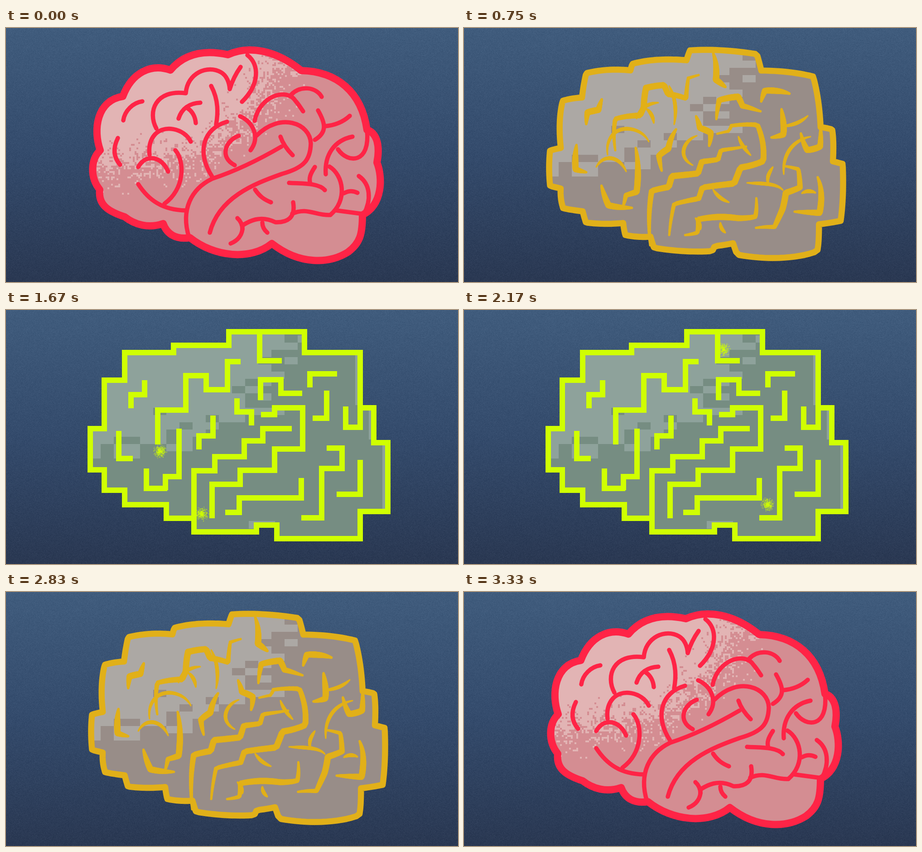
An HTML page with a canvas for the animation above (5010 ms loop, 998 px wide and 561 px high).

```html
<!DOCTYPE html>
<html lang="en">
<head>
<meta charset="utf-8">
<title>Brain maze</title>
<style>
html, body { margin: 0; width: 100%; height: 100%; overflow: hidden; background: #344969; }
canvas { display: block; width: 100vw; height: 100vh; }
</style>
</head>
<body>
<canvas id="stage" width="998" height="561"></canvas>
<script>
const W = 998, H = 561, LOOP = 5010, STEP = 83.34;
const ctx = document.getElementById('stage').getContext('2d');
const mix = (a, b, t) => a + (b - a) * t;
const rgb = (a, b, t) => `rgb(${a.map((v, i) => Math.round(mix(v, b[i], t)))})`;
const clamp = (v, lo, hi) => Math.min(hi, Math.max(lo, v));

function random(seed) {
  return () => {
    seed = (seed + 0x6D2B79F5) | 0;
    let t = Math.imul(seed ^ (seed >>> 15), 1 | seed);
    t = (t + Math.imul(t ^ (t >>> 7), 61 | t)) ^ t;
    return ((t ^ (t >>> 14)) >>> 0) / 4294967296;
  };
}
function hash(x, y) {
  let n = Math.imul(x, 374761393) ^ Math.imul(y, 668265263);
  n = Math.imul(n ^ (n >>> 13), 1274126177);
  return ((n ^ (n >>> 16)) >>> 0) / 4294967296;
}

function sample(d, count) {
  const path = document.createElementNS('http://www.w3.org/2000/svg', 'path');
  path.setAttribute('d', d);
  const length = path.getTotalLength();
  return Array.from({ length: count + 1 }, (_, i) => {
    const p = path.getPointAtLength(length * i / count);
    return [p.x, p.y];
  });
}

// Outline pieces between the notches: [brain, maze]
const outlineParts = [
  ['C535 38 595 48 652 94', 'V48 H659 V94'],
  ['C730 96 785 140 797 225', 'H782 V216'],
  ['C820 232 826 262 819 297', 'H812 V293'],
  ['C832 330 832 390 787 413', 'H843 V445 H782'],
  ['C787 455 782 475 755 495 C715 520 650 525 587 476', 'V505 H598 V475'],
  ['C540 514 460 506 406 463', 'H553 V490 H415 V460'],
  ['C375 468 355 455 347 432', 'H354 V430'],
  ['C315 443 285 435 262 417', 'H262 V398'],
  ['C225 405 203 390 207 357', 'H217 V353'],
  ['C185 330 187 290 208 270', 'H186 V262 H217'],
  ['C192 225 200 160 258 151', 'V155 H262'],
  ['C278 98 320 78 363 93', 'V94 H370'],
  ['C395 55 440 48 490 59', 'V78 H492']
];
function buildOutline(start, side) {
  let at = start;
  const points = outlineParts.flatMap(part => {
    const piece = sample(`M${at} ${part[side]}`, 24);
    at = piece[24];
    return piece;
  });
  return { points, path: new Path2D(`M${start} ${outlineParts.map(p => p[side]).join(' ')} Z`) };
}
const outline = [buildOutline([490, 59], 0), buildOutline([492, 78], 1)];

// Folds: [brain, maze]; those without a maze wall thin out and vanish
const folds = [
  ['M259 204 C262 183 280 165 301 162', 'M276 217 V187 H306 V155'],
  ['M247 243 C236 265 237 285 252 302', 'M249 267 V328 H280'],
  ['M332 222 C312 185 330 135 397 144 C400 100 445 80 475 98 C487 105 493 120 494 135 C500 115 508 100 518 86',
   'M335 297 V221 H397 V145 H442 V176 H489 V114 H518'],
  ['M533 60 C560 80 560 125 521 163', 'M560 54 V112 H609'],
  ['M488 207 C435 222 420 275 455 328', 'M457 233 V278 H426 V308'],
  ['M374 270 C395 295 395 355 350 388', 'M382 262 V368 H352 V398'],
  ['M292 345 C315 380 345 402 397 403', 'M310 350 V394 H356'],
  ['M404 462 C385 400 410 355 455 333 C510 315 560 290 608 262', 'M415 490 V355 H461 V324 H526 V289 H567 V262 H631'],
  ['M450 452 C470 375 545 345 610 322 C660 308 672 290 673 255 C672 210 605 185 553 238',
   'M455 460 V385 H517 V354 H593 V307 H655 V216 H593 V231 H563'],
  ['M517 195 C545 208 562 240 540 270', 'M510 195 V225 H542 V255'],
  ['M549 205 C560 150 620 130 640 162 C647 170 651 177 656 184', 'M562 199 V154 H607 V184 H654'],
  ['M630 147 C650 126 685 130 697 152', 'M671 171 V141 H731'],
  ['M689 182 C705 210 710 230 682 247', 'M708 178 V239 H677'],
  ['M733 268 C755 300 805 300 797 225', 'M750 213 V259 H782 V216'],
  ['M714 306 C745 325 755 380 716 413 C685 415 665 395 632 410', 'M708 305 H742 V350 H697 V459 H652'],
  ['M634 385 C640 420 620 430 595 429 C560 412 535 428 522 436 C524 458 510 470 496 476', 'M652 371 V415 H515 V447 H484'],
  ['M730 403 L790 411 C807 380 805 345 779 327', 'M730 407 H782 V331'],
  ['M453 128 C470 160 468 190 464 213'],
  ['M381 200 C388 178 405 166 429 165'],
  ['M402 178 C412 185 418 197 419 210'],
  ['M408 251 C395 222 345 210 325 240 C317 252 315 265 317 280'],
  ['M292 307 C310 275 345 285 358 317'],
  ['M606 240 C612 258 622 270 633 281'],
  ['M514 238 C485 248 470 285 505 303'],
  ['M703 217 C728 215 745 207 759 194'],
  ['M765 240 C725 248 703 280 706 323'],
  ['M746 365 C758 358 768 360 776 364'],
  ['M625 342 C655 344 690 342 704 358'],
  ['M682 307 C672 322 668 332 672 344'],
  ['M550 357 C560 372 570 379 585 385'],
  ['M511 420 C520 428 522 438 522 445'],
  ['M566 430 C566 440 570 446 577 452']
].map(([brain, maze]) => ({
  paths: [new Path2D(brain), maze && new Path2D(maze)],
  points: [sample(brain, 60), sample(maze || brain, 60)],
  vanishes: !maze
}));

// Spark positions, one per step
const FIRST_SPARK = 11;
const sparks = [
  [[525, 66], [455, 110], [385, 120], [319, 173], [322, 235], [255, 235], [240, 245], [207, 300], [275, 318],
   [340, 312], [365, 245], [430, 210], [495, 195], [525, 137], [615, 137], [572, 87], [574, 40]],
  [[609, 243], [535, 262], [450, 330], [384, 382], [398, 325], [440, 310], [500, 290], [450, 335], [432, 390],
   [432, 450], [433, 459], [470, 459], [475, 425], [530, 438], [600, 440], [670, 429], [675, 370], [678, 325],
   [740, 275], [795, 290], [828, 340], [851, 345]]
];

const rise = [.01, .03, .07, .12, .34, .64, .89];
const fall = [.95, .84, .64, .37, .17, .07, .03, .01];
function mazeAmount(step) {
  if (step < 4 || step >= 40) return 0;
  if (step < 11) return rise[step - 4];
  return step < 32 ? 1 : fall[step - 32];
}

function makeBackground() {
  const canvas = document.createElement('canvas');
  canvas.width = W;
  canvas.height = H;
  const c = canvas.getContext('2d'), g = c.createLinearGradient(0, 0, 0, H);
  g.addColorStop(0, '#405c7d');
  g.addColorStop(.5, '#344b6c');
  g.addColorStop(1, '#2a3852');
  c.fillStyle = g;
  c.fillRect(0, 0, W, H);
  const image = c.getImageData(0, 0, W, H), rnd = random(7);
  for (let i = 0; i < image.data.length; i += 4) {
    const grain = (rnd() + rnd() - 1) * 9;
    for (let j = 0; j < 3; j++) image.data[i + j] += grain;
  }
  c.putImageData(image, 0, 0);
  return canvas;
}
const background = makeBackground();

const blend = (a, b, t) => a.map((p, i) => [mix(p[0], b[i][0], t), mix(p[1], b[i][1], t)]);

function outlinePath(t) {
  if (t === 0 || t === 1) return outline[t].path;
  const path = new Path2D();
  blend(outline[0].points, outline[1].points, t).forEach(p => path.lineTo(...p));
  path.closePath();
  return path;
}

function drawTexture(shape, t) {
  ctx.save();
  ctx.clip(shape);
  ctx.fillStyle = rgb([212, 141, 146], [118, 141, 130], t);
  ctx.fillRect(170, 30, 700, 500);
  ctx.fillStyle = rgb([226, 180, 180], [142, 162, 155], t);
  const w = Math.round(4 + 25 * clamp(7 * (t - .09), 0, 1));
  const h = Math.max(4, Math.round(w * .56));
  for (let x = 180; x < 690; x += w) {
    const u = Math.max(0, (x + w / 2 - 250) / 370);
    const edge = 300 - 240 * u ** 3, slope = Math.hypot(1, 1.95 * u * u);
    for (let y = 40; y < 400; y += h) {
      const i = (x - 180) / w, j = (y - 40) / h;
      const noise = hash(i, j) + hash(i + 91, j + 17) + hash(i >> 1, (j >> 1) + 53) - 1.5;
      if ((edge - y - h / 2) / slope + noise * 62 > 0) ctx.fillRect(x, y, w, h);
    }
  }
  if (t === 1) {
    ctx.fillRect(771, 98, 6, 112);
    ctx.fillRect(801, 220, 6, 66);
    ctx.fillRect(831, 298, 6, 142);
    ctx.fillRect(536, 466, 58, 17);
  }
  ctx.restore();
}

function drawFold(fold, t) {
  if (t === 0 || t === 1) {
    if (!fold.paths[t]) return;
    ctx.lineWidth = t ? 12 : 9.5;
    ctx.stroke(fold.paths[t]);
    return;
  }
  // In between, folds swell in the middle and taper to the ends
  const taper = Math.min(1, 4 * t * (1 - t));
  const width = (mix(9.5, 12, t) + 3 * taper) * (fold.vanishes ? 1 - t * t : 1);
  const points = blend(...fold.points, t);
  for (let i = 1; i < points.length; i++) {
    const s = Math.abs(2 * (i - .5) / (points.length - 1) - 1);
    ctx.lineWidth = width * (1 - .7 * taper * s * s);
    ctx.beginPath();
    ctx.moveTo(...points[i - 1]);
    ctx.lineTo(...points[i]);
    ctx.stroke();
  }
}

function drawSpark([x, y], seed) {
  const rnd = random(seed);
  for (let i = 0; i < 420; i++) {
    const angle = rnd() * Math.PI * 2, r = 17 * rnd() ** 1.1 * (.55 + .45 * rnd());
    ctx.fillRect(x + r * Math.cos(angle), y + r * Math.sin(angle), 1.1, 1.1);
  }
}

function draw(step) {
  const t = mazeAmount(step), shape = outlinePath(t);
  ctx.drawImage(background, 0, 0);
  drawTexture(shape, t);
  ctx.strokeStyle = ctx.fillStyle = rgb([255, 36, 70], [208, 255, 0], t);
  ctx.lineCap = t === 1 ? 'butt' : 'round';
  ctx.lineJoin = t === 1 ? 'miter' : 'round';
  ctx.lineWidth = mix(16, 12, t);
  ctx.stroke(shape);
  folds.forEach(fold => drawFold(fold, t));
  sparks.forEach((route, i) => {
    const at = route[step - FIRST_SPARK];
    if (at) drawSpark(at, step * 10 + i);
  });
}

let shown = -1;
function tick() {
  const step = Math.min(40, Math.floor((performance.now() % LOOP + 4) / STEP));
  if (step !== shown) draw(shown = step);
  requestAnimationFrame(tick);
}
tick();
</script>
</body>
</html>
```
